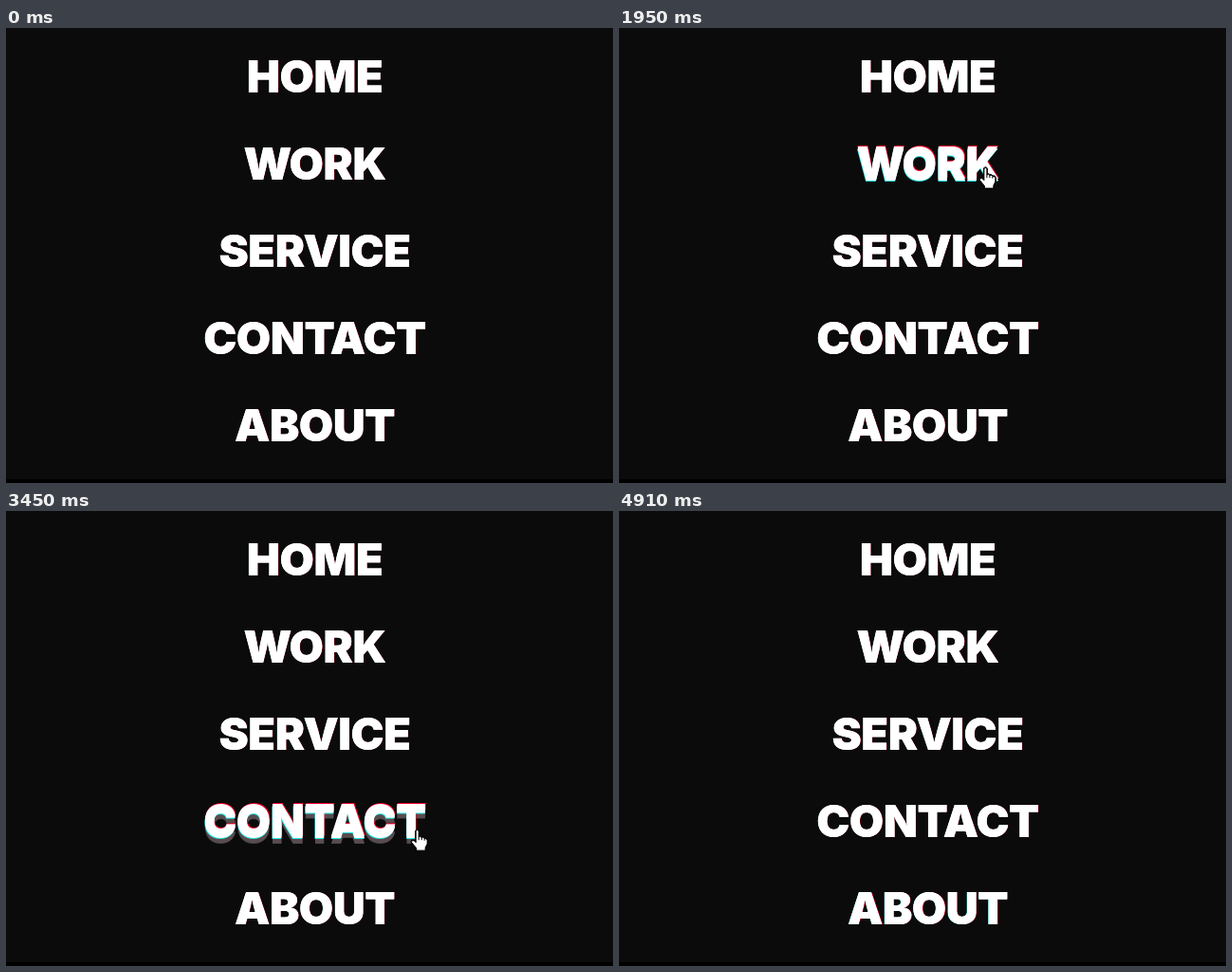
An HTML page with a canvas that plays this animation: 640 px wide and 480 px high, repeating every 5.45 s.

```html
<!DOCTYPE html>
<html lang="en">
<head>
<meta charset="utf-8">
<title>Menu hover</title>
<style>
  html, body { margin: 0; height: 100%; overflow: hidden; background: #0b0b0b; }
  canvas { display: block; }
</style>
</head>
<body>
<canvas id="stage" width="640" height="480"></canvas>
<script>
const ctx = document.getElementById('stage').getContext('2d');
const LOOP = 5450, STEP = 1000 / 24, CENTER = 325.5;
const ENTRY = 80, EXIT = 4900;

// Key points of the pointer tip: time, x, y
const route = [
  [ENTRY, 411, 4], [580, 394, 50], [790, 396, 39], [1210, 396, 103],
  [1460, 384, 137], [1950, 385, 146], [2180, 423, 176], [2450, 378, 217],
  [2950, 377, 287], [3560, 445, 346], [4040, 375, 407], [EXIT, 438, 443],
];

const arrow = new Path2D('M0 0V16L4 12.5L7 19L9.5 18L6.7 11.5H11Z');
const hand = new Path2D('M-1.5 1.5Q0-1 1.5 1.5V8Q3 6 4.5 8.5Q6 7 7.5 9.5Q10 8.5 10.5 11.5V15L8.5 19V22H-1V19.5L-6 13.5Q-6.5 10.5-3.5 11.5L-1.5 13.5Z');
const knuckles = new Path2D('M1.5 8V11M4.5 8.5V11M7.5 9.5V11.5');

const ramp = (v, from, to) => Math.max(0, Math.min(1, (v - from) / (to - from)));

function pointerAt(t) {
  const i = Math.max(1, route.findIndex(p => p[0] >= t));
  const [t0, x0, y0] = route[i - 1], [t1, x1, y1] = route[i];
  const k = ramp(t, t0, t1);
  return [x0 + (x1 - x0) * k, y0 + (y1 - y0) * k];
}

ctx.font = '900 47px Inter, sans-serif';
ctx.letterSpacing = '-0.5px';
ctx.textAlign = 'center';

// Hover times follow from the pointer crossing each link's box.
const links = ['HOME', 'WORK', 'SERVICE', 'CONTACT', 'ABOUT'].map((label, row) => {
  const base = 68 + 92 * row;
  const reach = ctx.measureText(label).width / 2 + 1;
  const inside = [];
  for (let t = ENTRY; t < EXIT; t += 5) {
    const [x, y] = pointerAt(t);
    if (Math.abs(x - CENTER) < reach && y > base - 46 && y < base + 8) inside.push(t);
  }
  return { label, base, enter: inside[0], leave: inside[inside.length - 1] };
});

function word(label, dx, y, color, alpha = 1) {
  ctx.globalAlpha = alpha;
  ctx.fillStyle = color;
  ctx.fillText(label, CENTER + dx, y);
  ctx.globalAlpha = 1;
}

function drawLink({ label, base, enter, leave }, t) {
  const age = t - enter;
  const shown = age >= 0 ? 1 - ramp(t, leave, leave + 390) ** 3 : 0;

  // A ghost hangs above, drops through the word and fades below it.
  if (age >= 0 && age < 450) {
    const y = base - 7 + 14 * ramp(age, 340, 380);
    const alpha = 0.5 * ramp(age, 0, 35) * (1 - ramp(age, 340, 450));
    word(label, 0.7, y - 0.6, '#f03050', alpha * 0.4);
    word(label, 0, y, '#fff', alpha);
  }
  const split = 2.1 * shown * (0.3 + 0.7 * ramp(age, 260, 380));
  word(label, 0.6, base - split, '#ff0030', shown ? 0.95 : 0.4);
  word(label, -0.4, base + split, '#20f0f0', shown ? 0.95 : 0.15);
  word(label, 0, base - split * 0.4, '#fff');
  word(label, 0, base + split * 0.4, '#fff');
}

function drawPointer(t) {
  if (t < ENTRY || t > EXIT) return;
  const hovering = links.some(l => t >= l.enter && t <= l.leave);
  const shape = hovering ? hand : arrow;
  ctx.save();
  ctx.translate(...pointerAt(t));
  ctx.strokeStyle = '#000';
  ctx.fillStyle = '#fff';
  ctx.lineWidth = 2;
  ctx.stroke(shape);
  ctx.fill(shape);
  ctx.lineWidth = 1;
  if (hovering) {
    ctx.stroke(shape);
    ctx.stroke(knuckles);
  }
  ctx.restore();
}

function draw(now) {
  let t = Math.floor((now % LOOP + 15) / STEP) * STEP;
  if (t > 1750 && t < 1950) t = 1750; // the pointer rests
  ctx.fillStyle = '#0b0b0b';
  ctx.fillRect(0, 0, 640, 480);
  ctx.fillStyle = '#000';
  ctx.fillRect(0, 476, 640, 4);
  links.forEach(link => drawLink(link, t));
  drawPointer(t);
}

const start = performance.now();
function tick() {
  draw(performance.now() - start);
  requestAnimationFrame(tick);
}
tick();
</script>
</body>
</html>
```
